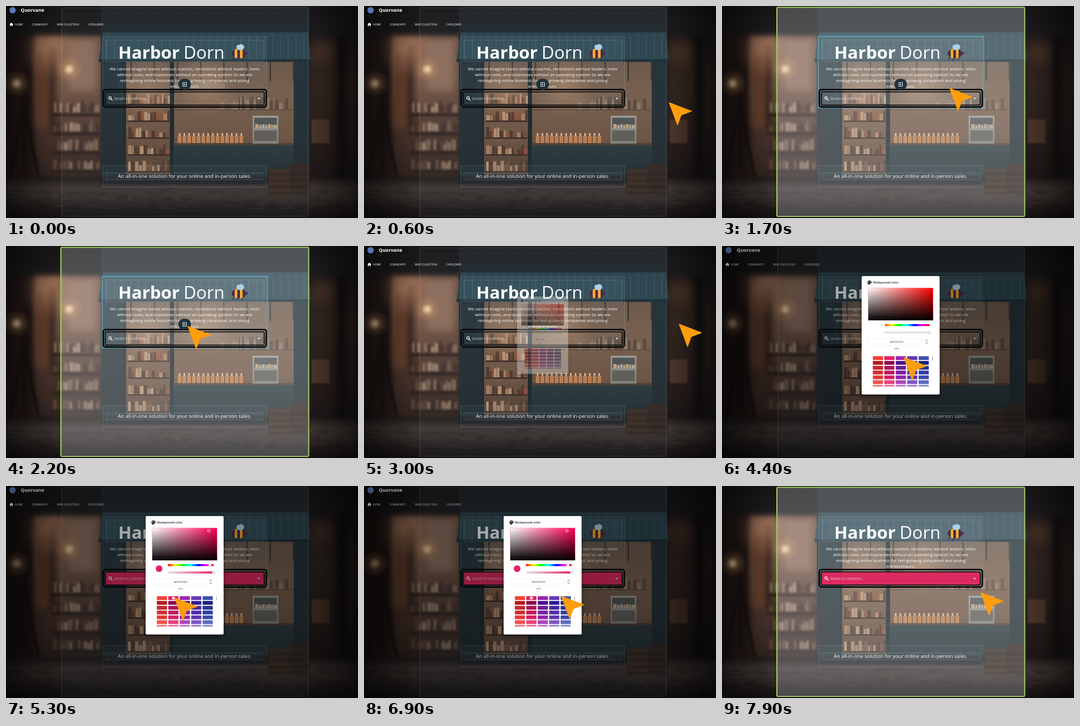
Write an HTML page with a canvas that moves like this. It is 668 by 402 pixels and loops after 8000 ms.

```html
<!DOCTYPE html>
<html lang="en">
<head>
<meta charset="utf-8">
<title>Shop page colour picker</title>
<style>
html, body { margin: 0; width: 100%; height: 100%; overflow: hidden; background: #171314; }
canvas, svg { position: absolute; left: 0; top: 0; width: 668px; height: 402px; }
text { font-family: "Open Sans", "Noto Sans", sans-serif; fill: #fff; }
.mid { text-anchor: middle; }
.edge { fill: #a8c8d80b; stroke: #c8dce030; }
.ring { fill: none; stroke: #0b0c0d; }
#dialog text { font-family: Roboto, Inter, sans-serif; fill: #555; }
</style>
</head>
<body>
<canvas id="scene" width="668" height="402"></canvas>
<svg viewBox="0 0 668 402">
  <defs>
    <linearGradient id="toWhite"><stop stop-color="#fff"/><stop offset="1" stop-color="#fff" stop-opacity="0"/></linearGradient>
    <linearGradient id="toBlack" x2="0" y2="1"><stop stop-opacity="0"/><stop offset="1"/></linearGradient>
    <linearGradient id="hues"><stop stop-color="#f00"/><stop offset=".17" stop-color="#ff0"/><stop offset=".33" stop-color="#0f0"/><stop offset=".5" stop-color="#0ff"/><stop offset=".67" stop-color="#00f"/><stop offset=".83" stop-color="#f0f"/><stop offset="1" stop-color="#f00"/></linearGradient>
    <pattern id="checker" width="3" height="3" patternUnits="userSpaceOnUse"><path d="M0 0h1.5v3h1.5v-1.5h-3z" fill="#ccc"/></pattern>
    <clipPath id="list"><rect x="278" y="207" width="125" height="59.5"/></clipPath>
    <clipPath id="body"><ellipse cx="442" cy="90" rx="13.5" ry="9.5"/></clipPath>
    <filter id="shadow" x="-20%" y="-20%" width="140%" height="140%"><feDropShadow dx="0" dy="3" stdDeviation="4" flood-opacity=".5"/></filter>
  </defs>

  <rect class="edge" x="105.5" y="3.5" width="468" height="395"/>
  <rect id="section" x="104" y="2.5" width="470.5" height="396.5" rx="2" fill="#fff" fill-opacity=".2" stroke="#a0ca60" stroke-width="2"/>
  <rect class="edge" x="183.5" y="58.5" width="311" height="134"/>
  <rect class="edge" x="189.5" y="64.5" width="300" height="41"/>
  <rect class="edge" x="183.5" y="302.5" width="311" height="41"/>
  <rect class="edge" x="189.5" y="316.5" width="300" height="13"/>
  <rect id="block" x="182.5" y="57.5" width="314" height="135.5" fill="#fff" fill-opacity=".03" stroke="#52a5c2" stroke-width="1.6"/>

  <g id="header">
    <circle cx="12.5" cy="8" r="6" fill="#5578b8"/>
    <text x="28" y="11.3" font-size="9" font-weight="700">Quorvane</text>
    <path d="M6.5 35l3.7-3.4 3.7 3.4h-1v3h-2v-2h-1.4v2h-2v-3z" fill="#fff"/>
    <g font-size="5">
      <text x="17" y="36.8">HOME</text>
      <text x="49" y="36.8">COMMUNITY</text>
      <text x="96.5" y="36.8">NEW COLLECTION</text>
      <text x="156" y="36.8">CATEGORIES</text>
    </g>
  </g>

  <text x="213" y="99.5" font-size="33" font-weight="700">Harbor</text>
  <text x="337" y="99.5" font-size="33">Dorn</text>
  <g id="bee">
    <path d="M432 97l-2 5M439 98l-1 5M448 98l1 4" stroke="#3b2540" stroke-width="1.5"/>
    <g clip-path="url(#body)">
      <path d="M428 79h28v22h-28z" fill="#4a2b50"/>
      <path d="M434 79h5v22h-5zM444 79h5v22h-5z" fill="#f4ad2b"/>
    </g>
    <path d="M454 87l7 2-6 4z" fill="#4a2b50"/>
    <path d="M440 83c-5-5-2-11 3-9 2-4 9-1 9 4 0 4-6 7-12 5z" fill="#a9d3e8"/>
  </g>
  <g id="copy" class="mid" font-size="7.9"></g>
  <text class="mid" x="339" y="326.3" font-size="9.5">An all-in-one solution for your online and in-person sales.</text>

  <rect id="field" x="188.5" y="163.5" width="301.5" height="24.5" rx="2" fill="#dc2b61"/>
  <rect class="ring" x="184.5" y="158.5" width="309.5" height="33" rx="4" stroke-width="3"/>
  <rect class="ring" x="188.5" y="162.8" width="301.5" height="25" rx="2" stroke-width="1.8"/>
  <circle cx="197.5" cy="174.5" r="2.4" fill="none" stroke="#fff" stroke-width="1.2"/>
  <path d="M199.2 176.3l3 3" stroke="#fff" stroke-width="1.3"/>
  <text x="205" y="178" font-size="6.65" fill-opacity=".75">Serach in collection...</text>
  <path d="M477 174.5h5l-2.5 2.6z" fill="#fff"/>

  <g id="pill">
    <rect id="bar" x="318" y="145" width="97" height="12" rx="2" fill="#cfd8dc"/>
    <rect x="327" y="138" width="24" height="21" rx="10" fill="#20323b"/>
    <path d="M335.5 147.2v-2h7v7h-7v-2M334.5 148.7h5M337.8 147l1.8 1.7-1.8 1.7" fill="none" stroke="#fff"/>
  </g>

  <rect id="scrim" width="668" height="402"/>
  <g id="dialog">
    <rect x="265" y="57" width="148" height="224.5" rx="2.5" fill="#fff" filter="url(#shadow)"/>
    <path d="M280 65.2a4 4 0 1 0 0 8c1.4 0 .5-1.5 1-2 .7-.7 3 .5 3-2.4 0-2-2-3.6-4-3.6z" fill="#333"/>
    <path d="M277.6 68.9h1M279.2 67.2h1M281.4 67.6h1" stroke="#fff" stroke-width="1.1"/>
    <text x="286.7" y="71.4" font-size="6.15" font-weight="500" style="fill:#333">Background color</text>
    <rect id="hueBox" x="277.5" y="79.5" width="123" height="61.5"/>
    <rect x="277.5" y="79.5" width="123" height="61.5" fill="url(#toWhite)"/>
    <rect x="277.5" y="79.5" width="123" height="61.5" fill="url(#toBlack)"/>
    <rect x="307" y="148" width="87" height="4" rx="1" fill="url(#hues)"/>
    <rect x="307" y="162" width="87" height="4" rx="1" fill="url(#checker)"/>
    <linearGradient id="alpha"><stop stop-color="#e91e63" stop-opacity="0"/><stop offset="1" stop-color="#e91e63"/></linearGradient>
    <g id="picked">
      <circle cx="385" cy="85" r="2.4" fill="none" stroke="#fff" stroke-width=".9"/>
      <circle cx="290.5" cy="156.8" r="6.3" fill="#e91e63"/>
      <rect x="307" y="162" width="87" height="4" rx="1" fill="url(#alpha)"/>
    </g>
    <circle id="hueThumb" cy="150" r="2.7" fill="#fff" stroke="#bbb" stroke-width=".6"/>
    <circle cx="394" cy="164" r="2.7" fill="#eee" stroke="#bbb" stroke-width=".6"/>
    <rect x="278" y="175.5" width="102" height="13" rx="1.5" fill="none" stroke="#ececec" stroke-width=".8"/>
    <text id="hex" class="mid" x="331.5" y="183.8" font-size="5.2"></text>
    <path d="M386.3 180l2.2-2.2 2.2 2.2M386.3 183l2.2 2.2 2.2-2.2" fill="none" stroke="#444" stroke-width=".9"/>
    <text class="mid" x="331.5" y="196" font-size="4.4">HEX</text>
    <g id="swatches" clip-path="url(#list)"></g>
    <g id="check">
      <circle cx="317.7" cy="212.5" r="2.8" fill="#fff"/>
      <path d="M316.2 212.5l1.1 1.1 2-2.2" fill="none" stroke="#e91e63" stroke-width=".7"/>
    </g>
    <path d="M399.5 210v7" stroke="#999"/>
  </g>
  <path id="cursor" d="M0 0L43 16.5 23 24 16 43z" fill="#ff9d0a" stroke="#ff9d0a" stroke-linejoin="round"/>
</svg>
<script>
const $ = id => document.getElementById(id);

// Blurred shop front
const c = $('scene').getContext('2d');
let seed = 7;
const rnd = () => (seed = seed * 16807 % 2147483647) / 2147483647;
const soft = px => c.filter = px ? `blur(${px}px)` : 'none';
function box(color, x, y, w, h) {
  c.fillStyle = color;
  c.fillRect(x, y, w, h);
}
function glow(color, x, y, r) {
  const g = c.createRadialGradient(x, y, 0, x, y, r);
  g.addColorStop(0, color);
  g.addColorStop(1, color.slice(0, 7) + '00');
  box(g, x - r, y - r, 2 * r, 2 * r);
}
function shade(x, y, w, h, ...stops) {
  const g = c.createLinearGradient(0, y, 0, y + h);
  stops.forEach((s, i) => g.addColorStop(i / (stops.length - 1), s));
  box(g, x, y, w, h);
}
function goods(x, y, w, h, colors) {
  for (let end = x + w; x < end;) {
    const step = 3 + rnd() * 5, tall = h * (.45 + rnd() * .55);
    box(colors[rnd() * colors.length | 0], x, y - tall, step - 1, tall);
    x += step;
  }
}
function paintScene() {
  box('#1c1819', 0, 0, 668, 402);
  soft(6);
  shade(48, 52, 136, 275, '#775545', '#765645', '#4b352d', '#30241f');
  box('#241917', 0, 45, 52, 290);
  box('#66402d', 56, 90, 30, 140);
  box('#241a18', 84, 75, 9, 160);
  box('#8b6b59', 120, 65, 48, 95);
  glow('#c08b6899', 82, 82, 55);
  shade(575, 40, 93, 300, '#1b1718', '#33261f', '#2b201c', '#1b1516');
  glow('#7a513a66', 602, 88, 40);
  box('#121012', 628, 0, 18, 330);
  shade(0, 0, 668, 55, '#171516', '#1c1b1d');
  soft(2);
  c.strokeStyle = '#1a1211';
  c.lineWidth = 6;
  c.beginPath();
  c.moveTo(34, 185); c.lineTo(8, 325);
  c.moveTo(34, 185); c.lineTo(62, 325);
  c.moveTo(34, 160); c.lineTo(34, 310);
  c.stroke();
  for (let y = 200; y < 320; y += 36) {
    goods(90, y + 2, 86, 22, ['#8d705d', '#5a4437', '#a58a74', '#3d2d26']);
    box('#2b201d', 86, y + 4, 94, 5);
  }
  for (const [x, y] of [[120, 120], [20, 147]]) {
    glow('#e7a56b88', x, y, 26);
    glow('#ffe2b4ff', x, y, 11);
  }
  soft(.7);
  shade(180, 0, 396, 340, '#1d2023', '#202d33', '#222c31', '#1d2529');
  shade(222, 104, 324, 216, '#6b5545', '#765b48', '#6c5140', '#4c3a30');
  c.beginPath();
  c.moveTo(184, 50); c.lineTo(573, 50); c.lineTo(579, 106); c.lineTo(175, 106);
  c.fillStyle = '#294049';
  c.fill();
  for (let x = 190; x < 570; x += 15) box('#355059', x, 56, 1.5, 48);
  box('#1b2b32', 176, 101, 402, 5);
  for (let x = 236; x < 545; x += 44) box('#3a3430', x, 106, 3, 36);
  for (let y = 185; y < 320; y += 32) {
    goods(232, y, 78, 20, ['#a07a5c', '#6c4a38', '#b08d6e', '#4c3428', '#8a4b32']);
    box('#3c2b23', 230, y, 80, 3);
  }
  goods(400, 196, 130, 26, ['#8e745f', '#7b604d', '#5a463a']);
  box('#5b4636', 320, 196, 224, 2);
  glow('#d8a47866', 380, 150, 60);
  glow('#d8a47855', 270, 160, 60);
  box('#1c2528', 311, 104, 8, 220);
  box('#1c272c', 222, 104, 6, 216);
  shade(318, 262, 228, 62, '#2a3639', '#20292d');
  box('#4a3b31', 318, 260, 228, 4);
  for (let x = 326; x < 450; x += 9) {
    box('#b97b4c', x, 246, 7, 14);
    box('#d9b18a', x + 2, 241, 3, 5);
  }
  shade(468, 208, 49, 53, '#96958f', '#7f7a73');
  box('#50504e', 471, 212, 43, 19);
  box('#5e5a55', 471, 236, 43, 20);
  goods(473, 232, 38, 9, ['#b99d80', '#a0a5a3']);
  soft(1.5);
  shade(0, 326, 668, 76, '#211b1a', '#3b3331', '#332c2a', '#201a1a', '#131011');
  box('#1b1c1e', 180, 322, 320, 16);
  for (let i = 0; i < 260; i++) box(rnd() < .5 ? '#5d504833' : '#15121244', rnd() * 668, 344 + rnd() * 40, 8 + rnd() * 14, 2);
  box('#3b2b23', 498, 309, 40, 54);
  box('#32241e', 540, 300, 36, 54);
  for (let y = 318; y < 360; y += 12) box('#201815', 498, y, 78, 2);
  box('#4a362a', 580, 215, 34, 45);
  soft(0);
  const side = c.createLinearGradient(0, 0, 668, 0);
  side.addColorStop(0, '#0008');
  side.addColorStop(.14, '#0000');
  side.addColorStop(.87, '#0000');
  side.addColorStop(1, '#0008');
  box(side, 0, 0, 668, 402);
}
paintScene();

$('copy').innerHTML = [
  'We cannot imagine teams without coaches, revolutions without leaders, trees',
  'without roots, and businesses without an operating system! So we are',
  'reimagining online business for fast-growing companies and young',
  'entrepreneurs.'
].map((line, i) => `<text x="339" y="${121.7 + i * 11}">${line}</text>`).join('');

$('swatches').innerHTML = [
  'f44336 b71c1c c62828 d32f2f e53935 ef5350 e57373',
  'e91e63 880e4f ad1457 c2185b d81b60 ec407a f06292',
  '9c27b0 4a148c 6a1b9a 7b1fa2 8e24aa ab47bc ba68c8',
  '673ab7 311b92 4527a0 512da8 5e35b1 7e57c2 9575cd',
  '3f51b5 1a237e 283593 303f9f 3949ab 5c6bc0 7986cb'
].map((col, i) => col.split(' ').map((hex, j) =>
  `<rect x="${286.3 + i * 21.7}" y="${209 + j * 9.1}" width="19.3" height="7.2" rx=".8" fill="#${hex}"/>`
).join('')).join('');

// Time in ms, then the tip of the pointer
const path = [
  [100, 690, 190], [1000, 500, 178], [1700, 432, 156], [2100, 345, 152], [2250, 345, 152],
  [2750, 598, 148], [3400, 598, 148], [4400, 345, 211], [4700, 320, 212],
  [6600, 320, 212], [7400, 491, 202], [8000, 491, 202]
];
const ramp = (t, from, ms) => Math.min(1, Math.max(0, (t - from) / ms));
const smooth = u => u * u * (3 - 2 * u);
const out = u => 1 - (1 - u) ** 3;
const fade = (id, v) => $(id).setAttribute('opacity', v);

function pointer(t) {
  const i = Math.max(1, path.findIndex(k => k[0] > t));
  const [a, b] = [path[i - 1], path[i]];
  const u = smooth(ramp(t, a[0], b[0] - a[0]));
  return [a[1] + (b[1] - a[1]) * u, a[2] + (b[2] - a[2]) * u];
}

function draw(now) {
  const t = now % 8000;
  const hover = ramp(t, 620, 150) - ramp(t, 2680, 150) + ramp(t, 7600, 150);
  const open = out(ramp(t, 2975, 225)) - out(ramp(t, 7440, 150));
  const pink = t >= 4800;

  fade('section', hover);
  fade('header', 1 - hover);
  fade('block', ramp(t, 1050, 100) - ramp(t, 2600, 100));
  fade('pill', 1 - ramp(t, 2900, 80));
  fade('bar', .16 * (1 - ramp(t, 0, 200)));
  fade('field', ramp(t, 4800, 250));
  fade('scrim', .34 * (ramp(t, 3000, 200) - ramp(t, 7440, 150)));

  fade('dialog', open);
  $('dialog').setAttribute('transform', `translate(339 169) scale(${.5 + open / 2}) translate(-339 -169)`);
  fade('picked', +pink);
  fade('check', +pink);
  $('hueBox').setAttribute('fill', pink ? '#ff0055' : '#f00');
  $('hueThumb').setAttribute('cx', pink ? 387 : 307);
  $('hex').textContent = pink ? '#E91E63FF' : '#FFFFFFFF';

  $('cursor').setAttribute('transform', `translate(${pointer(t)})`);
  requestAnimationFrame(() => draw(performance.now() - start));
}
const start = performance.now();
draw(0);
</script>
</body>
</html>
```
